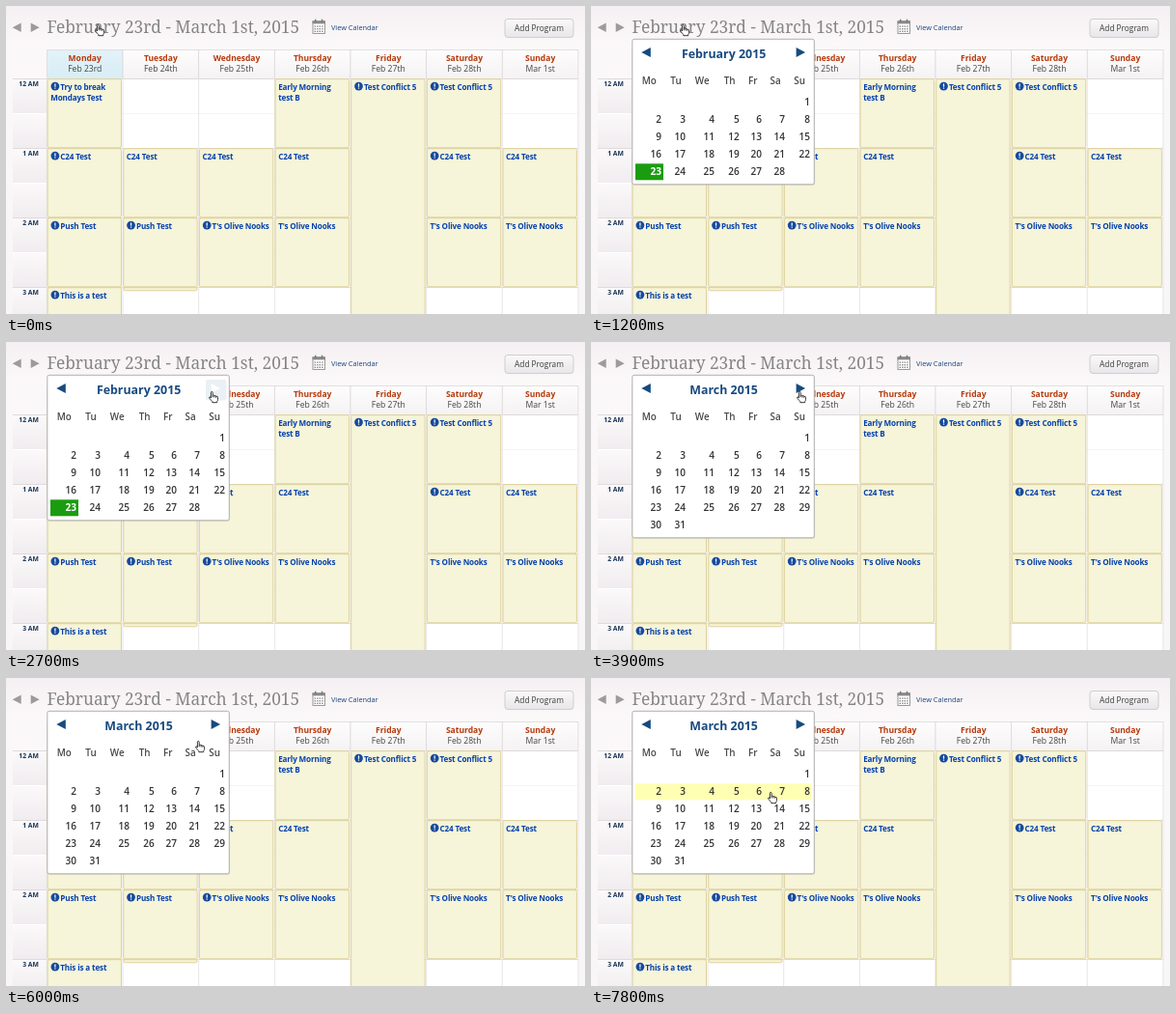
Recreate the animation shown at these times as an HTML page. Size 600 by 319 pixels, loop 8000 ms.

```html
<!DOCTYPE html>
<html lang="en">
<head>
<meta charset="utf-8">
<title>Program schedule</title>
<style>
html, body { margin: 0; width: 100%; height: 100%; overflow: hidden; background: #f9f6f8; }
svg { display: block; width: 600px; height: 319px; font-family: "Open Sans", sans-serif; }
.title { font: 17.25px "Noto Serif", serif; fill: #858585; }
.day { font-size: 8.5px; font-weight: 700; fill: #b5390c; text-anchor: middle; }
.date { font-size: 8.6px; fill: #444; text-anchor: middle; }
.hour { font-size: 6.8px; font-weight: 700; fill: #1d3558; text-anchor: end; }
.event { font-size: 8.1px; font-weight: 700; letter-spacing: -.14px; fill: #0541ad; }
.link { font-size: 7.35px; font-weight: 500; fill: #15447a; }
.button { font-size: 8.3px; fill: #3c3c3c; text-anchor: middle; }
.month { font-size: 12.4px; font-weight: 700; fill: #174a80; text-anchor: middle; }
.week { font-size: 9.9px; font-weight: 600; fill: #484848; text-anchor: middle; }
.num { font-size: 10.1px; font-weight: 600; fill: #333; text-anchor: end; }
.picked { font-weight: 700; fill: #fff; }
</style>
</head>
<body>
<svg viewBox="0 0 600 319">
  <defs>
    <linearGradient id="page" x2="0" y2="1"><stop stop-color="#f5f0f3"/><stop offset=".12" stop-color="#fbf8f9"/><stop offset="1" stop-color="#f9f6f8"/></linearGradient>
    <linearGradient id="head" x2="0" y2="1"><stop stop-color="#fefdfd"/><stop offset="1" stop-color="#f4f2f3"/></linearGradient>
    <linearGradient id="today" x2="0" y2="1"><stop stop-color="#e2f2f9"/><stop offset="1" stop-color="#d8edf5"/></linearGradient>
    <linearGradient id="slot" x2="0" y2="1"><stop stop-color="#fbf9fa"/><stop offset="1" stop-color="#f0ecef"/></linearGradient>
    <linearGradient id="btn" x2="0" y2="1"><stop stop-color="#fbfafb"/><stop offset="1" stop-color="#e8e6e8"/></linearGradient>
  </defs>
  <g id="schedule"></g>
  <g id="picker"></g>
  <path id="hand" fill="#fff" stroke="#222" stroke-width=".9" stroke-linejoin="round"
    d="M2.4 7V1.3Q2.4.4 3.3.4T4.2 1.3V4.4Q5.8 3.5 6.1 4.8Q7.4 4.1 7.8 5.3Q9.5 4.9 9.5 6.4V8.6Q9.5 9.9 8.7 10.6V11.7H3.8V10.6Q2.6 9.4 .9 7.3Q.1 6 1.2 5.8Q1.9 5.8 2.4 7M4.2 4.4V6.3M6.1 4.8V6.5M7.8 5.3V6.7"/>
</svg>
<script>
const LOOP = 8000, STEP = 300, OPEN_AT = 600, NEXT_AT = 3300;
const $ = id => document.getElementById(id);

const rect = (x, y, w, h, fill, extra = "") =>
  `<rect x="${x}" y="${y}" width="${w}" height="${h}" fill="${fill}" ${extra}/>`;
const text = (x, y, cls, s) => `<text x="${x}" y="${y}" class="${cls}">${s}</text>`;
const path = (d, fill, extra = "") => `<path d="${d}" fill="${fill}" ${extra}/>`;
// A triangle whose tip lies dx from its base
const arrow = (x, y, dx, h, fill) => path(`M${x} ${y - h / 2}l${dx} ${h / 2}l${-dx} ${h / 2}z`, fill);

// Schedule grid
const COL_W = 78.65;
const colX = i => 42.4 + COL_W * i;
const rowY = hour => 75.5 + 72 * hour;
const DAYS = [
  ["Monday", "Feb 23rd"], ["Tuesday", "Feb 24th"], ["Wednesday", "Feb 25th"], ["Thursday", "Feb 26th"],
  ["Friday", "Feb 27th"], ["Saturday", "Feb 28th"], ["Sunday", "Mar 1st"]
];
const CAFE = "T's Olive Nooks";
// A leading "!" marks an alert; each event is [day, hour, label, length in px]
const EVENTS = [
  [0, 0, "!Try to break|Mondays Test"], [0, 1, "!C24 Test"], [0, 2, "!Push Test"], [0, 3, "!This is a test"],
  [1, 1, "C24 Test"], [1, 2, "!Push Test"], [1, 3, "", 4],
  [2, 1, "C24 Test"], [2, 2, "!" + CAFE],
  [3, 0, "Early Morning|test B"], [3, 1, "C24 Test"], [3, 2, CAFE],
  [4, 0, "!Test Conflict 5", 260],
  [5, 0, "!Test Conflict 5"], [5, 1, "!C24 Test"], [5, 2, CAFE],
  [6, 1, "C24 Test"], [6, 2, CAFE]
];

function eventBox([day, hour, label, length = 72]) {
  const x = colX(day), y = rowY(hour), alert = label[0] === "!";
  const lines = label.replace("!", "").split("|");
  let out = rect(x + .7, y + .2, 76.4, length - .9, "#f6f4d9", 'rx="1.8" stroke="#ddd29a"');
  if (alert) {
    const cx = x + 8.5, cy = y + 7.6;
    out += `<circle cx="${cx}" cy="${cy}" r="4.4" fill="#174a9c"/>` +
      rect(cx - .6, cy - 2.7, 1.2, 3.3, "#fff") + rect(cx - .6, cy + 1.4, 1.2, 1.2, "#fff");
  }
  lines.forEach((s, i) => out += text(x + (alert && !i ? 13.9 : 3.8), y + 11.2 + 10.8 * i, "event", s));
  return out;
}

function calendarIcon() {
  let out = rect(318, 15.8, 12.4, 12.6, "#fff", 'stroke="#8a8a8a" stroke-width=".9"') +
    rect(317.6, 15.4, 13.2, 3, "#8a8a8a") +
    rect(320, 13.7, 1.4, 3, "#777") + rect(326.8, 13.7, 1.4, 3, "#777");
  for (let i = 0; i < 12; i++)
    out += rect(319.6 + 2.5 * (i % 4), 20.4 + 2.6 * Math.floor(i / 4), 1.4, 1.4, "#888");
  return out;
}

function schedule() {
  let out = rect(0, 0, 600, 319, "url(#page)") + rect(42.4, 45.5, COL_W * 7, 280, "#fff") +
    arrow(15.7, 22.3, -9, 9.4, "#9c9a9c") + arrow(25.7, 22.3, 9, 9.4, "#9c9a9c") +
    text(42.5, 28.3, "title", "February 23rd - March 1st, 2015") + calendarIcon() +
    text(337, 25, "link", "View Calendar") +
    rect(517, 13.5, 71, 19, "url(#btn)", 'rx="3" stroke="#cfcdcf"') +
    text(552.5, 26, "button", "Add Program");

  for (let i = 0; i < 7; i++) {
    const y = rowY(i / 2);
    out += rect(7, y, 35, 36, "url(#slot)") +
      path(`M7 ${y}H42`, "none", `stroke="${i % 2 ? "#fff" : "#dedade"}"`) +
      path(`M42.5 ${y}H593`, "none", `stroke="${i % 2 ? "#f5f4f5" : "#dddbdd"}"`);
    if (i % 2 === 0) out += text(33.9, y + 7, "hour", `${i / 2 || 12} AM`);
  }
  DAYS.forEach(([name, date], i) => {
    const x = colX(i), mid = x + COL_W / 2;
    out += rect(x, 45.5, COL_W, 30, i ? "url(#head)" : "url(#today)", 'stroke="#dcd9db" stroke-width=".8"') +
      text(mid, 57.2, "day", name) + text(mid, 68.4, "date", date);
  });
  for (let i = 0; i < 8; i++)
    out += path(`M${colX(i)} 75V319`, "none", 'stroke="#e2dfe1" stroke-width=".8"');
  return out + EVENTS.map(eventBox).join("");
}

// Date picker
const WEEK = ["Mo", "Tu", "We", "Th", "Fr", "Sa", "Su"];
const WEEK_X = [60.3, 88, 115.2, 143.6, 167.8, 191.2, 216.2];
const NUM_X = [73, 98, 128, 153.7, 177, 201, 227];
const FIRST_COL = 6, ROW_TOP = 91.3, ROW_H = 18;

function picker(isMarch, x, y) {
  const rows = isMarch ? 6 : 5;
  const height = isMarch ? 168.5 : 150.5;
  const overNext = !isMarch && x > 207 && x < 229 && y > 39 && y < 61;
  const hoverRow = Math.floor((y - ROW_TOP) / ROW_H);
  let out = rect(43.5, 35.2, 188.6, height, "#000", 'rx="2" opacity=".1"') +
    rect(42.8, 34.3, 188.5, height, "#fff", 'rx="2" stroke="#b3b0ae"');
  if (overNext) out += rect(207, 39, 21.5, 21.5, "#eaf0f3", 'rx="2"');
  out += arrow(61.8, 47.9, -9.5, 10, "#174a80") +
    arrow(212.6, 47.9, 9.5, 10, overNext ? "#fff" : "#174a80") +
    text(137.6, 54.2, "month", `${isMarch ? "March" : "February"} 2015`);
  WEEK.forEach((s, i) => out += text(WEEK_X[i], 81.4, "week", s));
  if (hoverRow >= 0 && hoverRow < rows)
    out += rect(46, ROW_TOP + ROW_H * hoverRow, 182.5, 17, "#ffffb3");
  for (let d = 1; d <= (isMarch ? 31 : 28); d++) {
    const cell = FIRST_COL + d - 1, row = Math.floor(cell / 7), col = cell % 7;
    const picked = !isMarch && d === 23;
    if (picked) out += rect(46, ROW_TOP + ROW_H * row, 29, 17, "#1b9c10");
    out += text(NUM_X[col], 103.2 + ROW_H * row, picked ? "num picked" : "num", d);
  }
  return out;
}

// Pointer path: [time, x, y] of the hand's top left corner
const TRACK = [
  [0, 92, 19], [1500, 92, 19], [2400, 210, 51], [3000, 210, 51], [3300, 213, 51],
  [5100, 213, 51], [6000, 196, 65], [7500, 183, 118], [7800, 183, 118]
];

function pointer(t) {
  const i = Math.max(1, TRACK.findIndex(k => k[0] >= t));
  const [t0, x0, y0] = TRACK[i - 1], [t1, x1, y1] = TRACK[i];
  const p = (t - t0) / (t1 - t0), e = p * p * (3 - 2 * p);
  return [x0 + (x1 - x0) * e, y0 + (y1 - y0) * e];
}

let shown = -1;
function draw(now) {
  const t = Math.floor(now % LOOP / STEP) * STEP;
  if (t !== shown) {
    shown = t;
    const [x, y] = pointer(t);
    $("picker").innerHTML = t < OPEN_AT ? "" : picker(t >= NEXT_AT, x + 3.3, y);
    $("hand").setAttribute("transform", `translate(${x} ${y})`);
  }
}

$("schedule").innerHTML = schedule();
const start = performance.now();
function tick() {
  draw(performance.now() - start);
  requestAnimationFrame(tick);
}
tick();
</script>
</body>
</html>
```
